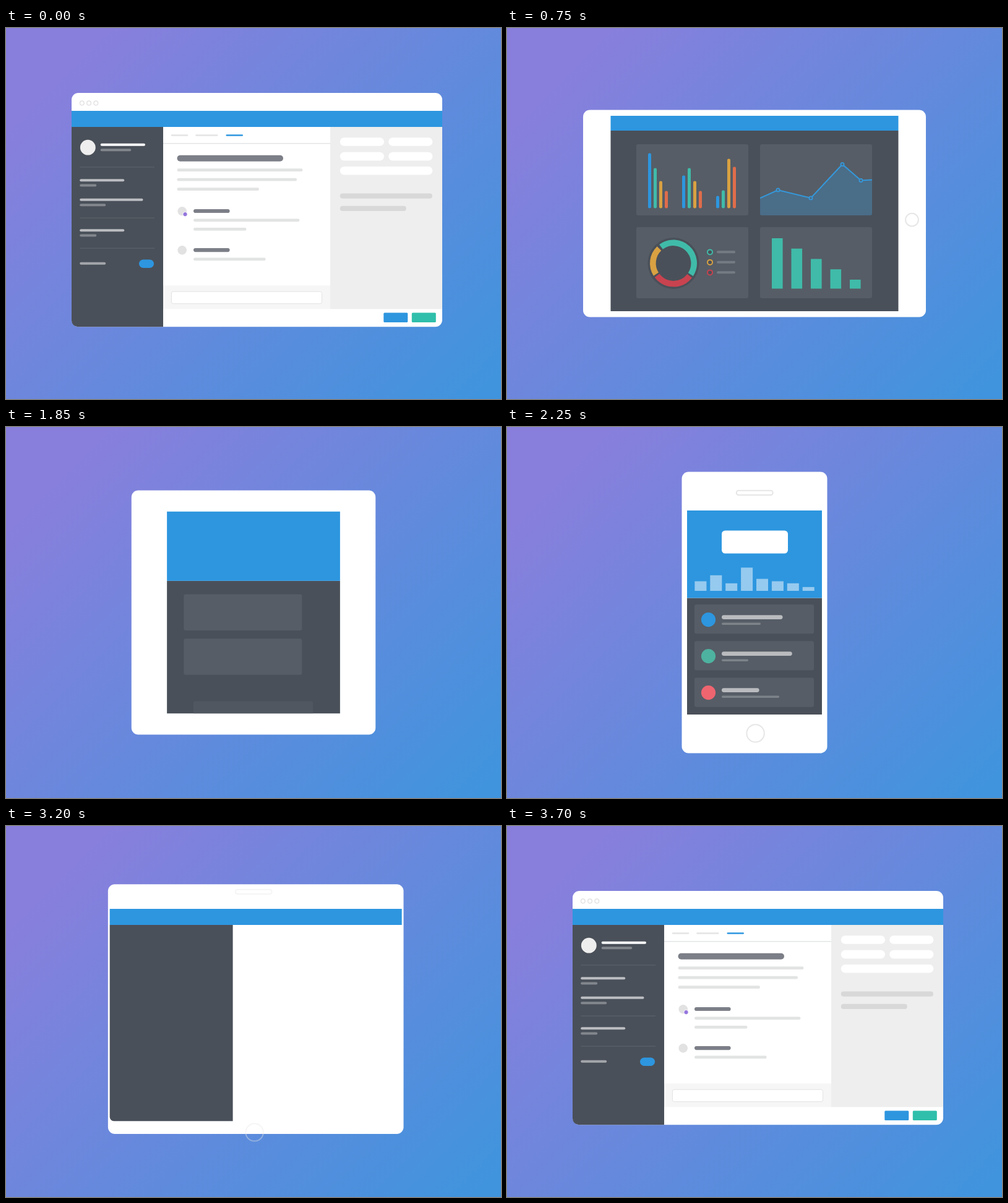
Write an HTML page that moves like this. It is 800 by 600 pixels and loops after 4.5 s.

```html
<!DOCTYPE html>
<html lang="en">
<head>
<meta charset="utf-8">
<title>Responsive devices</title>
<style>
  html, body { margin: 0; width: 100%; height: 100%; overflow: hidden; }
  body { background: linear-gradient(135deg, #887fdc 12%, #3f94dd 98%); }
  svg { display: block; width: 800px; height: 600px; }
  .ring { fill: none; stroke: #e6e6e6; stroke-width: 2; }
</style>
</head>
<body>
<svg viewBox="0 0 800 600">
  <defs>
    <clipPath id="bodyClip"><rect id="bodyMask" rx="11"/></clipPath>
    <clipPath id="darkClip"><rect id="darkMask"/></clipPath>
    <clipPath id="lineClip"><rect id="lineMask" x="409" y="188" height="115"/></clipPath>
    <path id="trend" d="M409 275L438 262L491 275L542 220.5L572 246.5L590 245.5"/>
  </defs>

  <rect id="body" rx="11" fill="#fff"/>
  <g clip-path="url(#bodyClip)"><g id="panes"></g></g>
  <path id="dark" fill="#4a5059"/>
  <rect id="blue" fill="#2d96df"/>

  <g clip-path="url(#bodyClip)">
    <g id="dots"></g>
    <g id="side"></g>
    <g id="main"></g>
    <g id="fields"></g>
    <g id="buttons"></g>
  </g>

  <g id="cards" clip-path="url(#darkClip)" fill="#565d66"></g>

  <g id="charts">
    <g id="columns"></g>
    <g clip-path="url(#lineClip)">
      <path d="M409 275L438 262L491 275L542 220.5L572 246.5L590 245.5V300a3 3 0 0 1-3 3H412a3 3 0 0 1-3-3Z" fill="#2d96df" opacity=".28"/>
      <use href="#trend" fill="none" stroke="#3498db" stroke-width="2"/>
      <g id="markers" fill="#50677a" stroke="#3498db" stroke-width="1.8"></g>
    </g>
    <circle id="hub" cx="269" cy="380.5" r="41.5" fill="#4a5059"/>
    <g id="arcs" fill="none" stroke-width="9.6"></g>
    <g id="legend"></g>
  </g>
  <circle id="tabletHome" class="ring" cx="654.5" cy="310.2" r="10.4"/>

  <g id="hero">
    <rect x="347" y="167.5" width="107" height="37" rx="5.5" fill="#fff"/>
    <g id="histogram" opacity=".5"></g>
  </g>
  <g id="row0"></g>
  <g id="row1"></g>
  <g id="row2"></g>
  <g id="phoneParts" class="ring">
    <rect x="370.8" y="102.8" width="58.8" height="7.2" rx="3.4"/>
    <circle cx="401.6" cy="495.4" r="14.2"/>
  </g>
</svg>

<script>
const LOOP = 4500, STEP = 50;
const BLUE = '#2d96df', TEAL = '#40bba9', GOLD = '#d9a142', CORAL = '#e06d4b', RED = '#c8434f';
const $ = id => document.getElementById(id);

function set(el, attrs) {
  for (const k in attrs) el.setAttribute(k, attrs[k]);
  return el;
}
function add(parent, tag, attrs) {
  const el = set(document.createElementNS('http://www.w3.org/2000/svg', tag), attrs);
  return $(parent).appendChild(el);
}
function bar(parent, x, y, width, height, fill, rx = height / 2) {
  return add(parent, 'rect', { x, y, width, height, fill, rx });
}
function disc(parent, cx, cy, r, fill, more) {
  return add(parent, 'circle', { cx, cy, r, fill, ...more });
}
function lines(parent, x, y, gap, height, fill, widths) {
  widths.forEach((w, i) => bar(parent, x, y + i * gap, w, height, fill));
}

function buildDesktop() {
  for (let i = 0; i < 3; i++)
    disc('dots', 122.8 + i * 11.25, 121.4, 3.3, 'none', { stroke: '#e3e3e3', 'stroke-width': 1.5 });

  bar('panes', 254, 186, 270, 1.5, '#e3e5e7', 0);
  bar('panes', 254, 416.5, 270, 38, '#f6f6f6', 0);
  bar('panes', 524, 160, 181, 294.5, '#eee', 0);

  const entry = (x, y, w, sub, fill) => {
    bar('side', x, y, w, 4, fill);
    bar('side', x, y + 8.4, sub, 4, '#82868d');
  };
  disc('side', 132.3, 193.2, 12.4, '#eee');
  entry(152.7, 186.8, 72.3, 49.5, '#fff');
  entry(119.2, 244.2, 72, 27, '#bbbdc1');
  entry(119.2, 275.8, 102.3, 42, '#bbbdc1');
  entry(119.2, 325.2, 72, 27, '#bbbdc1');
  for (const y of [224.4, 306.6, 355.6]) bar('side', 119.5, y, 120.5, 1.2, '#5b6169', 0);
  bar('side', 119.2, 378.8, 42, 4, '#a3a6ab');
  bar('side', 215, 374.5, 24, 13.5, BLUE);

  bar('main', 266.8, 172.2, 27.5, 2.6, '#e4e4e4');
  bar('main', 306.2, 172.2, 36.3, 2.6, '#e4e4e4');
  bar('main', 355.5, 172.2, 27.5, 2.6, BLUE);
  bar('main', 276.5, 205.8, 171.5, 10, '#7c7f87');
  lines('main', 276.5, 227.3, 15.5, 4.8, '#e2e3e3', [203, 193.5, 132.5]);
  const comment = (y, widths) => {
    disc('main', 284.7, y, 7.3, '#e2e2e2');
    bar('main', 303, y - 3.4, 58.6, 6.2, '#7c7f87');
    lines('main', 303, y + 12.1, 14.6, 4.8, '#e2e3e3', widths);
  };
  comment(296.3, [171.5, 85.5]);
  comment(359.4, [116.7]);
  disc('main', 289.5, 301.2, 3.7, '#9575dd', { stroke: '#fff' });
  set(bar('main', 267.4, 426.2, 243.1, 19.6, '#fff', 3), { stroke: '#e2e2e2' });

  for (const x of [539.8, 618.2]) lines('fields', x, 177.2, 23.6, 13.6, '#fff', [71.2, 71.2]);
  bar('fields', 539.8, 224, 149.6, 13.6, '#fff');
  lines('fields', 539.8, 267.6, 20.2, 8.2, '#d8d8d8', [149.2, 107]);
  [BLUE, '#2fbfaa'].forEach((fill, i) => bar('buttons', 610.3 + i * 45.5, 460.5, 39, 15.5, fill, 1.5));
}

// Bars that rise from a fixed foot
const growing = [];
function grow(parent, x, foot, width, tall, fill, rx, from) {
  growing.push({ el: bar(parent, x, foot - tall, width, tall, fill, rx), foot, tall, from });
}

const arcs = [];
function buildTablet() {
  const tints = [BLUE, TEAL, GOLD, CORAL];
  [[89, 65, 44, 28], [53, 65, 44, 28], [20, 29, 80, 67]].forEach((talls, g) =>
    talls.forEach((tall, i) =>
      grow('columns', 228 + g * 55 + i * 9, 291.4, 5, tall, tints[i], 2.2, 400 + g * 50)));
  for (let i = 0; i < 5; i++)
    grow('columns', 428 + i * 31.5, 421.4, 17.6, 81.5 - i * 16.8, TEAL, 0.5, 500 + i * 25);

  // Markers sit on the inner points of the trend line
  const points = $('trend').getAttribute('d').slice(1).split('L').slice(1, -1);
  for (const p of points) disc('markers', ...p.split(' '), 2.6);

  for (const [a, b, stroke] of [[-127, 33, TEAL], [38, 143, RED], [148, 226, GOLD]])
    arcs.push({ a, b, el: add('arcs', 'path', { stroke }) });
  [TEAL, GOLD, RED].forEach((stroke, i) => {
    const y = 362.4 + i * 16.5;
    disc('legend', 328, y, 4, '#4a5059', { stroke, 'stroke-width': 2 });
    bar('legend', 339, y - 2.2, 30, 4, '#757b83');
  });
}

function buildPhone() {
  [15.5, 25.2, 12.2, 37.6, 19.4, 15.5, 12.2, 6.2].forEach((tall, i) =>
    grow('histogram', 303.4 + i * 24.9, 265, 19, tall, '#fff', 0, 1880 + i * 10));
  [[BLUE, 98.5, 63], ['#4eb2a0', 113.8, 43], ['#ee6570', 60.6, 93]].forEach(([fill, w, sub], i) => {
    const y = 311.6 + i * 59;
    disc('row' + i, 325.5, y, 11.6, fill);
    bar('row' + i, 347, y - 7.4, w, 6.8, '#b9bbbe');
    bar('row' + i, 347, y + 4.8, sub, 3.5, '#7d8389');
  });
}

const part = (t, from, to) => Math.min(1, Math.max(0, (t - from) / (to - from)));
const mix = (a, b, p) => a.map((v, i) => v + (b[i] - v) * p);

// body: x, y, w, h; screen: left, width, bottom, corner; blue: top, height; dark: width
const DESK = { body: [106, 105, 599, 378.2], screen: [106, 599, 483.2, 10], blue: [134, 26], dark: [148] };
const TAB = { body: [123, 132.5, 554, 335], screen: [167.5, 465, 458, 0], blue: [142, 24], dark: [465] };
const PHONE = { body: [282.5, 72.5, 235, 455], screen: [291, 218, 465, 0], blue: [135, 141.5], dark: [218] };

// Desktop, tablet, phone, desktop: one span of time for each change
function morph(t, key, ...spans) {
  return [TAB, PHONE, DESK].reduce((v, next, i) => mix(v, next[key], part(t, ...spans[i])), DESK[key]);
}

function drawDevice(t) {
  const [x, y, width, height] = morph(t, 'body', [0, 300], [1700, 2000], [3000, 3300]);
  const [left, wide, bottom, r] = morph(t, 'screen', [0, 300], [1700, 1900], [3000, 3300]);
  const [top, tall] = morph(t, 'blue', [0, 300], [1700, 1900], [3000, 3200]);
  const [w] = morph(t, 'dark', [0, 300], [1700, 1900], [3125, 3400]);
  const edge = top + tall;
  for (const id of ['body', 'bodyMask']) set($(id), { x, y, width, height });
  set($('blue'), { x: left, y: top, width: wide, height: tall });
  set($('dark'), { d: `M${left} ${edge}h${w}V${bottom}H${left + r}a${r} ${r} 0 0 1 ${-r} ${-r}Z` });
  set($('darkMask'), { x: left, y: edge, width: w, height: bottom - edge });
}

// Four cards on the tablet; the left two become phone rows, a third row joins them
const cards = Array.from({ length: 5 }, () => add('cards', 'rect', { rx: 3 }));
const phoneCard = row => [303, 287 + row * 59.2, 193, 47.3];

function drawCards(t) {
  const gone = part(t, 2900, 3000);
  cards.forEach((el, i) => {
    const col = i % 2, row = i >> 1, extra = i === 4;
    const start = extra ? 1700 : 200 + 50 * (col + row);
    const shown = part(t, start, start + 250);
    const leave = col ? part(t, 1600, 1750) : gone;
    let box = extra ? phoneCard(2) : [209 + col * 200, 188 + row * 134, 181, 115];
    if (!col && !extra) box = mix(box, phoneCard(row), part(t, 1600, 1900));
    const [x, y, width, height] = box;
    set(el, { x, y: y + (1 - shown) * 95, width, height, opacity: shown * (1 - leave) });
  });
}

// id: [enter, leave, dx, dy]; leaving before entering means visible across the loop's seam
const groups = {
  panes: [3300, 0],
  dots: [3450, 0],
  side: [3475, 0, -13, 0],
  main: [3500, 0, 0, 10],
  fields: [3525, 0, 0, 10],
  buttons: [3550, 0, 0, 10],
  charts: [300, 1600],
  hub: [430, 1600],
  legend: [600, 1600],
  tabletHome: [150, 1600],
  hero: [1930, 2900],
  phoneParts: [1950, 3140]
};
for (let i = 0; i < 3; i++) groups['row' + i] = [1950 + i * 75, 2900, 0, 15];

function drawGroups(t) {
  for (const id in groups) {
    const [enter, leave, dx = 0, dy = 0] = groups[id];
    const a = part(t, enter, enter + 150), b = 1 - part(t, leave, leave + 100);
    const shift = t < enter ? 0 : 1 - a;
    set($(id), {
      opacity: enter < leave ? Math.min(a, b) : Math.max(a, b),
      transform: `translate(${dx * shift} ${dy * shift})`
    });
  }
}

function arcPath(a, b) {
  const point = deg => {
    const rad = deg * Math.PI / 180;
    return `${269 + 33.2 * Math.cos(rad)} ${380.5 + 33.2 * Math.sin(rad)}`;
  };
  return `M${point(a)}A33.2 33.2 0 0 1 ${point(b)}`;
}

function drawCharts(t) {
  for (const { el, foot, tall, from } of growing) {
    const height = tall * part(t, from, from + 150);
    set(el, { y: foot - height, height });
  }
  set($('lineMask'), { width: 181 * part(t, 450, 700) });
  const sweep = part(t, 450, 750);
  for (const { a, b, el } of arcs) set(el, { d: sweep ? arcPath(a, a + (b - a) * sweep) : '' });
}

function draw(t) {
  drawDevice(t);
  drawCards(t);
  drawGroups(t);
  drawCharts(t);
}

let start;
function tick(now) {
  start ??= now;
  draw(Math.floor((now - start) % LOOP / STEP) * STEP);
  requestAnimationFrame(tick);
}
buildDesktop();
buildTablet();
buildPhone();
draw(0);
requestAnimationFrame(tick);
</script>
</body>
</html>
```
